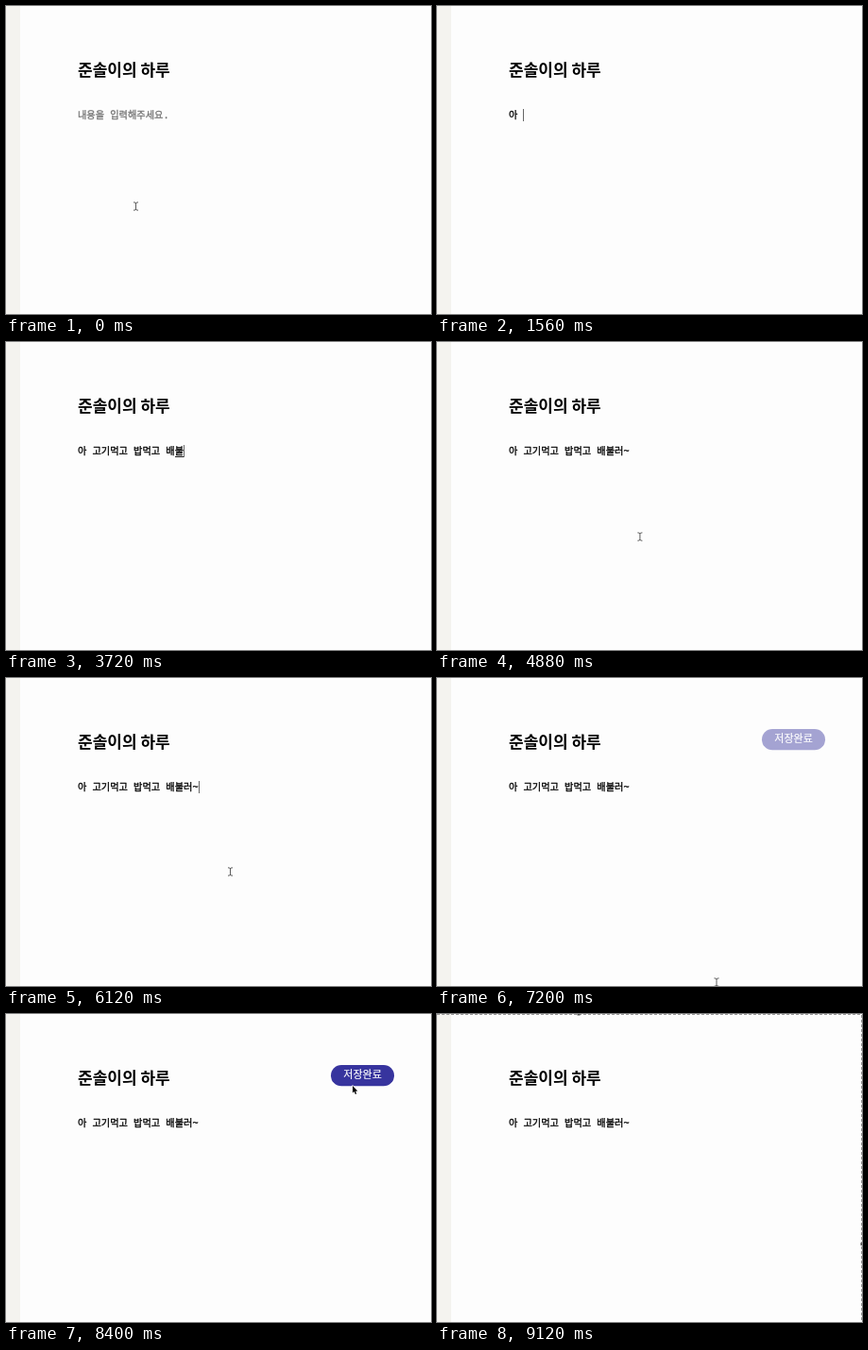
These frames come from a looping animation (450 by 326 pixels, 10 s). An HTML page with a canvas:

```html
<!DOCTYPE html>
<html lang="ko">
<head>
<meta charset="utf-8">
<title>하루 메모</title>
<style>
  html, body { margin: 0; width: 100%; height: 100%; overflow: hidden; background: #fdfdfd; }
  canvas { display: block; width: 450px; height: 326px; }
</style>
</head>
<body>
<canvas id="stage"></canvas>
<script>
const W = 450, H = 326, LOOP = 10000, TICK = 40;
const SANS = '"Noto Sans CJK KR", "Noto Sans CJK", "Noto Sans KR", sans-serif';
const TITLE_FONT = `bold 17px ${SANS}`;
const BODY_FONT = `10.2px "Liberation Mono", ${SANS}`;
const BUTTON_FONT = `11px ${SANS}`;
const LEFT = 76, BODY_Y = 118.5;
const TYPED = 4120, BLUR = 6400, SHOW = 6680, HIDE = 8760, END = 9120;

const canvas = document.getElementById('stage');
const ctx = canvas.getContext('2d');
const dpr = window.devicePixelRatio || 1;
canvas.width = W * dpr;
canvas.height = H * dpr;

const clamp = v => Math.max(0, Math.min(1, v));
const smooth = v => v * v * (3 - 2 * v);

// Two-set Hangul composition: every key press yields one state of the line
const INITIALS = 'ㄱㄲㄴㄷㄸㄹㅁㅂㅃㅅㅆㅇㅈㅉㅊㅋㅌㅍㅎ';
const FINALS = ' ㄱㄲㄳㄴㄵㄶㄷㄹㄺㄻㄼㄽㄾㄿㅀㅁㅂㅄㅅㅆㅇㅈㅊㅋㅌㅍㅎ';
const BASE = 0xac00;

function keyStates(text) {
  const states = [];
  let done = '', open = false;
  for (const char of text) {
    const code = char.charCodeAt(0) - BASE;
    const isSyllable = code >= 0 && code < 11172;
    const final = code % 28;
    if (isSyllable) {
      const initial = INITIALS[Math.floor(code / 588)];
      // A consonant first joins an open syllable as its final
      states.push(open
        ? done.slice(0, -1) + String.fromCharCode(done.charCodeAt(done.length - 1) + FINALS.indexOf(initial))
        : done + initial);
      if (final) states.push(done + String.fromCharCode(BASE + code - final));
    }
    done += char;
    states.push(done);
    open = isSyllable && !final;
  }
  return states;
}

// Bursts of typing: first key, last key, number of keys
const bursts = [[560, 560, 1], [1120, 1120, 1], [1560, 2320, 11], [2520, 2880, 5], [3040, 3880, 11], [TYPED, TYPED, 1]];
const states = keyStates('아 고기먹고 밥먹고 배불러~');

function typedAt(t) {
  let keys = 0;
  for (const [first, last, count] of bursts) {
    if (t < first) break;
    const gap = (last - first) / (count - 1) || 1;
    keys += Math.min(count, Math.floor((t - first) / gap) + 1);
  }
  return keys ? states[keys - 1] : '';
}

// Pointer moves: start, end, destination
const moves = [
  [0, 1, 137.5, 212],
  [4720, 4960, 242, 204],
  [5760, 5800, 237.5, 205],
  [SHOW, 7120, 296, 322],
  [7680, 8360, 367, 76],
  [8440, 8720, 434, 66],
  [8720, 8920, 444, -12]
];

function pointerAt(t) {
  let [, , x, y] = moves[0];
  for (const [start, end, toX, toY] of moves) {
    const k = smooth(clamp((t - start) / (end - start)));
    x += (toX - x) * k;
    y += (toY - y) * k;
  }
  return [x, y];
}

function write(text, x, y, font, color, weight = 0) {
  ctx.font = font;
  ctx.fillStyle = ctx.strokeStyle = color;
  ctx.fillText(text, x, y);
  if (weight) {
    ctx.lineWidth = weight;
    ctx.lineJoin = 'round';
    ctx.strokeText(text, x, y);
  }
}

function drawLine(t) {
  const text = typedAt(t);
  if (text) write(text, LEFT, BODY_Y, BODY_FONT, '#000', 0.3);
  else write('내용을 입력해주세요.', LEFT, BODY_Y, BODY_FONT, '#757575', 0.3);

  const end = Math.round(LEFT + ctx.measureText(text).width);
  // The syllable being composed is underlined
  if (text && t < TYPED && !text.endsWith(' ')) {
    ctx.fillStyle = '#222';
    ctx.fillRect(end - 9, 121, 9, 1);
  }
  const blinkOn = t < TYPED || Math.floor((t - TYPED) / 500) % 2 === 0;
  if (t >= 120 && t < BLUR && blinkOn) {
    ctx.fillStyle = '#666';
    ctx.fillRect(end, 109, 1, 13);
  }
}

function drawButton(t) {
  const alpha = clamp((t - SHOW) / 1160) * clamp((END - t) / (END - HIDE));
  if (!alpha) return;
  ctx.globalAlpha = alpha;
  ctx.fillStyle = '#37349e';
  ctx.beginPath();
  ctx.roundRect(344, 54, 67, 22.3, 11.15);
  ctx.fill();
  ctx.globalAlpha = 1;
  write('저장완료', 357.3, 68.3, BUTTON_FONT, '#fff', 0.2);
}

function drawBeam(x, y) {
  ctx.strokeStyle = '#333';
  ctx.lineWidth = 0.8;
  ctx.beginPath();
  ctx.moveTo(x, y - 3.5);
  ctx.lineTo(x, y + 3.5);
  for (const side of [-1, 1]) {
    ctx.moveTo(x - 2.5, y + side * 4.2);
    ctx.quadraticCurveTo(x, y + side * 4.2, x, y + side * 3.2);
    ctx.quadraticCurveTo(x, y + side * 4.2, x + 2.5, y + side * 4.2);
  }
  ctx.stroke();
}

function drawArrow(x, y) {
  ctx.save();
  ctx.translate(x, y);
  const shape = new Path2D('M0 0V7.6L1.7 6.1L2.9 8.9L4.2 8.3L3 5.7L5.3 5.6Z');
  ctx.lineJoin = 'round';
  ctx.lineWidth = 1.4;
  ctx.strokeStyle = '#fff';
  ctx.stroke(shape);
  ctx.fillStyle = '#000';
  ctx.fill(shape);
  ctx.restore();
}

function drawSelection() {
  ctx.strokeStyle = '#999';
  ctx.lineWidth = 1;
  ctx.setLineDash([3, 2]);
  ctx.beginPath();
  ctx.moveTo(0, 0.5);
  ctx.lineTo(W - 0.5, 0.5);
  ctx.lineTo(W - 0.5, H);
  ctx.stroke();
  ctx.setLineDash([]);
  ctx.fillStyle = '#555';
  ctx.fillRect(148.5, 0, 3, 1.5);
  ctx.fillRect(W - 1.5, 242, 1.5, 3);
}

function draw(t) {
  ctx.setTransform(dpr, 0, 0, dpr, 0, 0);
  ctx.fillStyle = '#fdfdfd';
  ctx.fillRect(0, 0, W, H);
  ctx.fillStyle = '#f4f3ef';
  ctx.fillRect(0, 0, 15, H);
  write('준솔이의 하루', LEFT, 74.4, TITLE_FONT, '#000');
  drawLine(t);
  drawButton(t);
  // The pointer hides while typing
  if (t < 600 || t >= 4800) (t < 8160 ? drawBeam : drawArrow)(...pointerAt(t));
  if (t >= END) drawSelection();
}

const begin = performance.now();
function frame() {
  const t = (performance.now() - begin) % LOOP;
  draw(Math.floor(t / TICK) * TICK);
  requestAnimationFrame(frame);
}
frame();
</script>
</body>
</html>
```
